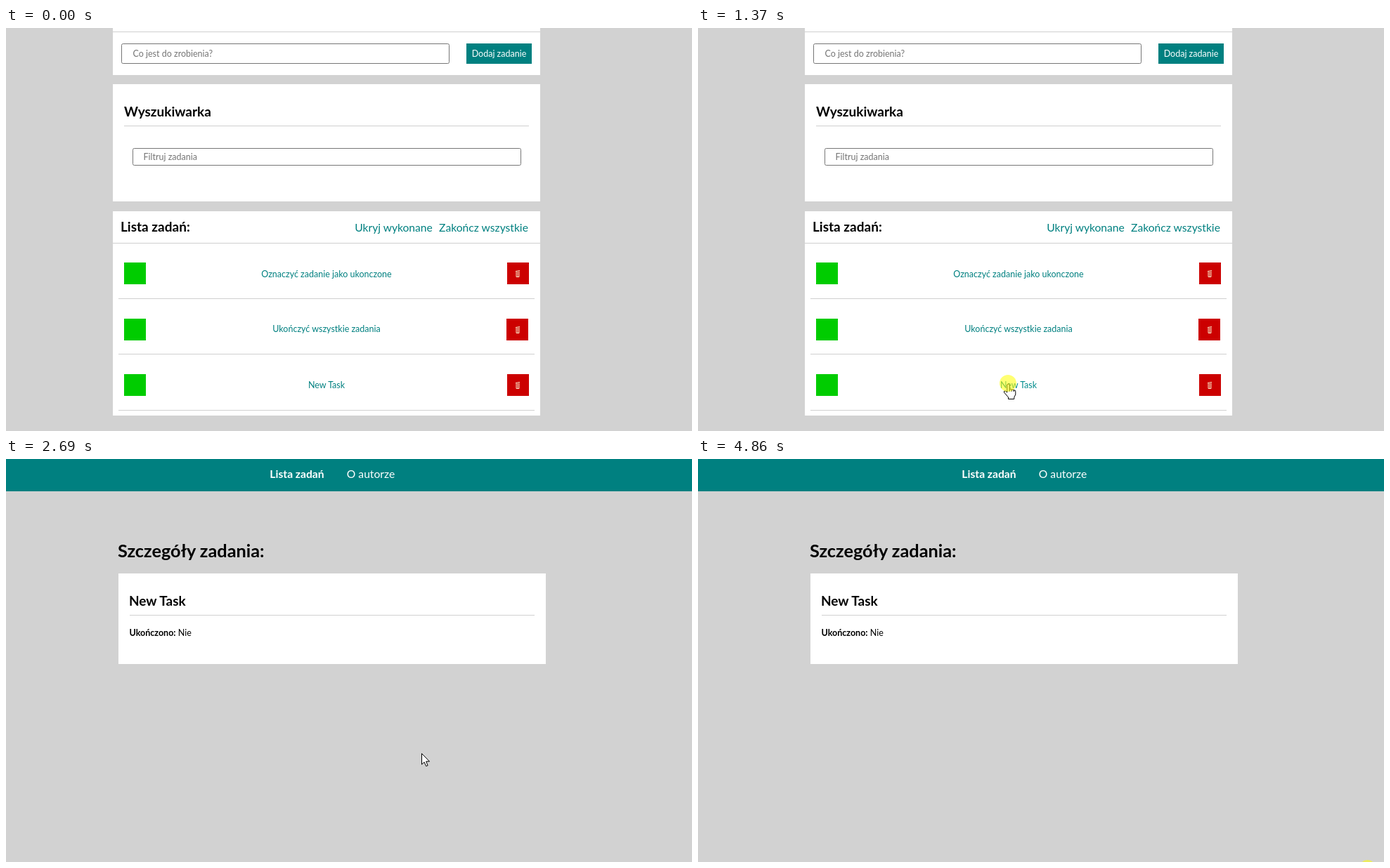
Recreate the animation shown at these times as an HTML page. Size 976x574 px, loop 4.94 s.

```html
<!DOCTYPE html>
<html lang="pl">
<head>
<meta charset="utf-8">
<title>Lista zadań</title>
<style>
  html, body { margin: 0; width: 100%; height: 100%; overflow: hidden; background: #d2d2d2; }
  svg { display: block; font: 12.5px Lato, sans-serif; }
  .h { font-size: 19px; font-weight: 700; }
  .h1 { font-size: 25.3px; font-weight: 700; }
  .nav { font-size: 15.65px; }
  .bold { font-weight: 700; }
  .mid { text-anchor: middle; }
  .white, .card { fill: #fff; }
  .teal { fill: #008080; }
  .hint { fill: #757575; }
  .hover { fill: #008c8c; }
  .line { fill: #d0d0d0; }
  .input { fill: #fff; stroke: #767676; }
  .bin { fill: none; stroke: #f7e3c4; }
  .pointer { fill: #fff; stroke: #000; stroke-linejoin: round; }
</style>
</head>
<body>
<svg width="976" height="574" viewBox="0 0 976 574">
  <g id="list">
    <rect class="card" x="152" width="608" height="67"/>
    <rect class="line" x="152" y="5" width="608" height="1"/>
    <rect class="input" x="164.5" y="22.5" width="466" height="28" rx="2"/>
    <text class="hint" x="180.5" y="41">Co jest do zrobienia?</text>
    <rect class="teal" x="655" y="22" width="93" height="29"/>
    <text class="white mid" x="701.5" y="41">Dodaj zadanie</text>

    <rect class="card" x="152" y="80" width="608" height="167"/>
    <text class="h" x="168" y="126">Wyszukiwarka</text>
    <rect class="line" x="168" y="139" width="576" height="1"/>
    <rect class="input" x="180.5" y="171.5" width="552" height="24" rx="2"/>
    <text class="hint" x="195.5" y="188">Filtruj zadania</text>

    <rect class="card" x="152" y="261" width="608" height="291"/>
    <text class="h" x="163" y="290">Lista zadań:</text>
    <text class="nav teal mid" x="551.5" y="290">Ukryj wykonane</text>
    <text class="nav teal mid" x="679.5" y="290">Zakończ wszystkie</text>
    <rect class="line" x="152" y="306" width="608" height="1"/>
    <g id="rows"></g>
  </g>

  <g id="details">
    <rect class="teal" width="976" height="46"/>
    <text class="nav bold white mid" x="414" y="27">Lista zadań</text>
    <text class="nav white mid" x="519" y="27">O autorze</text>
    <text class="h1" x="159" y="140">Szczegóły zadania:</text>
    <rect class="card" x="160" y="163" width="608" height="129"/>
    <text class="h" x="175" y="209">New Task</text>
    <rect class="line" x="176" y="222" width="576" height="1"/>
    <text x="175.5" y="252"><tspan class="bold">Ukończono:</tspan> Nie</text>
  </g>

  <g id="cursor" class="pointer">
    <path id="arrow" d="M0 0V15.5L3.6 12.2 6.2 18 8.6 17 6.2 11.3H11Z"/>
    <g id="hand">
      <path d="M-1.7 1.5Q0-1 1.7 1.5V8q1.6-1 3 .6 1.6-.8 3 .7 2.6-.5 2.6 2V15.5l-2 4V22H0V19.5L-6 12.5q-.6-2.6 2-2l2.3 2Z"/>
      <path d="M1.7 8v3M4.7 8.6v2.6M7.7 9.3v2.2"/>
    </g>
  </g>
  <circle id="click" r="12" fill="#ff0" opacity=".55"/>
</svg>
<script>
const $ = id => document.getElementById(id);
const LOOP = 4940, STEP = 76.7;

$('rows').innerHTML = [
  ['Oznaczyć zadanie jako ukonczone', 334, 713, 385],
  ['Ukończyć wszystkie zadania', 414, 712, 464],
  ['New Task', 493, 713, 544]
].map(([name, y, x, line]) => `
  <rect x="168" y="${y}" width="31" height="31" fill="#0c0"/>
  <text class="teal mid" x="456" y="${line - 31 + (line < 400)}">${name}</text>
  <rect x="${x}" y="${y}" width="31" height="31" fill="#c00"/>
  <path class="bin" d="M725 ${y + 12.5}l6-1M726 ${y + 13}v7.5h4v-8M728 ${y + 13}v7"/>
  <rect class="line" x="160" y="${line}" width="592" height="1"/>`).join('');
const task = $('rows').querySelectorAll('text')[2];

const smooth = p => p * p * (3 - 2 * p);

// Curved glide in seven held steps; first is the number of the opening step.
function glide(t, from, bend, to, first = 1, ease = smooth) {
  const step = Math.min(6, Math.floor((t + 2) / STEP));
  const p = ease((step + first) / (6 + first)), q = 1 - p;
  return from.map((v, i) => Math.round(q * q * v + 2 * p * q * bend[i] + p * p * to[i]));
}

function cursorAt(t) {
  if (t < 70) return null;
  if (t < 600) return glide(t - 70, [880, 605], [880, 400], [798, 454], 1, p => p);
  if (t < 1140) return glide(t - 600, [798, 454], [620, 478], [441, 505]);
  if (t < 1610) return [441, 506];
  if (t < 2370) return glide(t - 1610, [441, 506], [560, 380], [595, 427]);
  if (t < 2690) return [593, 425];
  if (t < 2940) return [591, 419];
  if (t < 2990) return [588, 419];
  if (t < 3170) return [587, 419];
  if (t < 3700) return glide(t - 3170, [588, 421], [757, 491], [927, 562], 0);
  if (t < 3780) return [931, 568];
  return null;
}

function show(el, on) { el.style.display = on ? '' : 'none'; }

function draw() {
  const t = performance.now() % LOOP;
  const onList = t < 1460;
  const pos = cursorAt(t);
  const overTask = onList && pos !== null && pos[0] < 482 && pos[1] > 490;
  const pressed = t >= 1140 && onList;

  show($('list'), onList);
  show($('details'), !onList);
  task.classList.toggle('hover', overTask);

  show($('cursor'), pos);
  show($('arrow'), !overTask);
  show($('hand'), overTask);
  if (pos) $('cursor').setAttribute('transform', `translate(${pos[0] + .5} ${pos[1] + .5})`);

  show($('click'), pressed || t >= 4860);
  $('click').setAttribute('transform', pressed ? 'translate(441 506)' : 'translate(952.5 583)');
  requestAnimationFrame(draw);
}
draw();
</script>
</body>
</html>
```
